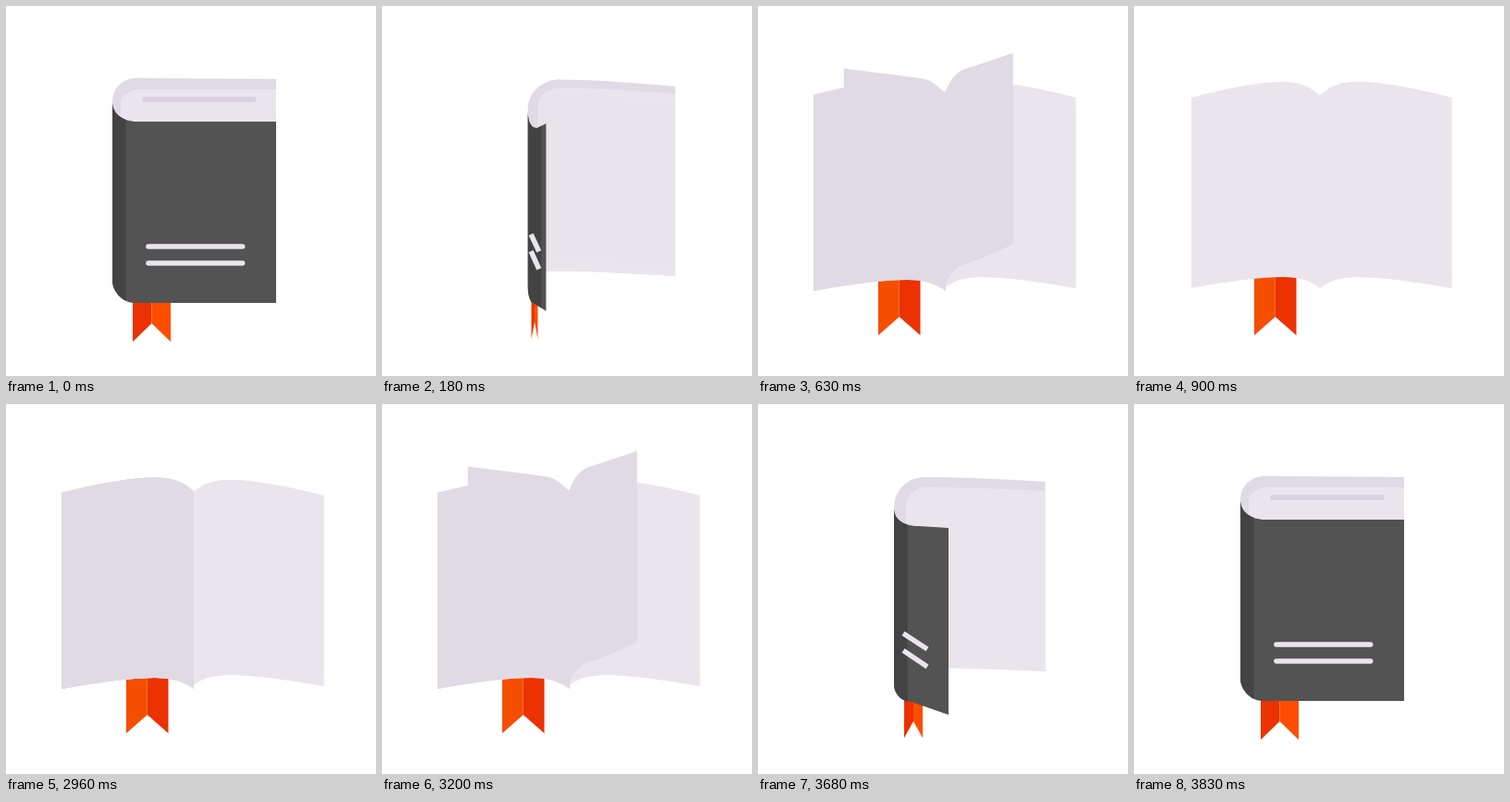
Animation of 400 by 400 pixels, one loop 9.36 s. Source, as an HTML page with a canvas:

```html
<!DOCTYPE html>
<html lang="en">
<head>
<meta charset="utf-8">
<title>Book</title>
<style>
html, body { margin: 0; width: 100%; height: 100%; overflow: hidden; background: #fff; }
canvas { display: block; width: 400px; height: 400px; }
</style>
</head>
<body>
<canvas id="stage" width="400" height="400"></canvas>
<script>
const ctx = document.getElementById('stage').getContext('2d');
const LOOP = 9360, STEP = 30, CLOSE_AT = 2960, LAST = 30;
const PAPER = '#eae5ec', SHADE = '#e0dae4', COVER = '#535353', SPINE = '#434343';
const RED = '#eb3200', ORANGE = '#fd4e00';
const HALF_OPEN = 0.376;

const clamp = v => Math.max(0, Math.min(1, v));
const lerp = (a, b, t) => a + (b - a) * t;
const smooth = t => { t = clamp(t); return t * t * (3 - 2 * t); };

// Value for the closed, part-open and open poses.
const pose = (p, a, b, c) => p < HALF_OPEN
  ? lerp(a, b, p / HALF_OPEN)
  : lerp(b, c, (p - HALF_OPEN) / (1 - HALF_OPEN));

// Page edge from the spine over a knot to the outer corner.
function profile(x, y, kx, ky, ex, ey, sag = 0, bend = 0.25) {
  return {
    x, y, kx, ky, ex, ey,
    ax: lerp(x, kx, bend), ay: lerp(y, ky, 0.67),
    bx: lerp(kx, x, 0.45), by: ky - sag / 2,
    cx: lerp(kx, ex, 0.35), cy: ky + sag
  };
}

function sheet(top, bottom, color) {
  const t = top, b = bottom;
  ctx.beginPath();
  ctx.moveTo(t.x, t.y);
  ctx.bezierCurveTo(t.ax, t.ay, t.bx, t.by, t.kx, t.ky);
  ctx.quadraticCurveTo(t.cx, t.cy, t.ex, t.ey);
  ctx.lineTo(b.ex, b.ey);
  ctx.quadraticCurveTo(b.cx, b.cy, b.kx, b.ky);
  ctx.bezierCurveTo(b.bx, b.by, b.ax, b.ay, b.x, b.y);
  ctx.closePath();
  ctx.fillStyle = color;
  ctx.fill();
}

function poly(color, ...pts) {
  ctx.beginPath();
  pts.forEach(([x, y]) => ctx.lineTo(x, y));
  ctx.closePath();
  ctx.fillStyle = color;
  ctx.fill();
}

function stroke(color, x1, y1, x2, y2, cap) {
  ctx.strokeStyle = color;
  ctx.lineWidth = 5.5;
  ctx.lineCap = cap;
  ctx.beginPath();
  ctx.moveTo(x1, y1);
  ctx.lineTo(x2, y2);
  ctx.stroke();
}

function ribbon(k) {
  const near = k(137, 158, 175.5), far = k(178, 178, 130), mid = (near + far) / 2;
  const top = k(300, 300, 285), tip = k(363, 361, 356), notch = k(343, 343, 336);
  poly(RED, [near, top], [mid, top], [mid, notch], [near, tip]);
  poly(k(0, 0, 1) > 0.5 ? '#f54e00' : ORANGE, [far, top], [mid, top], [mid, notch], [far, tip]);
}

function block(k) {
  const x = k(115, 147, 201), ex = k(292, 310.5, 343.5);
  const bend = k(0, 0, 0.25);
  const bottom = profile(x, k(284, 284, 305), k(140, 180, 241), k(284, 285, 293), ex, k(284, 289, 305));
  const outer = profile(x, k(104, 113, 97), k(140, 180, 241), k(78, 79, 82), ex, k(79, 84, 99), 0, bend);
  const inner = profile(k(124, 160, 201), k(106, 111, 97), k(146, 182, 241), k(90, 90, 82),
    ex, k(90, 94, 99), 0, bend);
  sheet(outer, bottom, k(1, 1, 0) > 0 ? SHADE : PAPER);
  sheet(inner, { ...bottom, x: inner.x }, PAPER);
}

function cover(k, x, w) {
  const y = k(104, 113, 118), low = k(297, 303, 303), ex = x + w;
  const kx = x + Math.min(27, w / 2), bx = x + Math.min(24, w * 0.32);
  const kTop = k(125, 132, 132), kLow = k(321, 322, 318);
  ctx.save();
  ctx.beginPath();
  ctx.moveTo(x, y);
  ctx.bezierCurveTo(x, y + 12, lerp(x, kx, 0.4), kTop, kx, kTop);
  ctx.lineTo(ex, k(125, 134, 99));
  ctx.lineTo(ex, k(321, 336, 305));
  ctx.lineTo(bx, kLow);
  ctx.bezierCurveTo(lerp(x, bx, 0.45), kLow, x, low + 11, x, low);
  ctx.closePath();
  ctx.fillStyle = COVER;
  ctx.fill();
  ctx.clip();
  ctx.fillStyle = SPINE;
  ctx.fillRect(x - 1, 0, 15.5, 400);
  const from = x + w * k(0.22, 0.17, 0.17), to = x + w * k(0.795, 0.61, 0.61);
  const cap = k(0, 1, 1) > 0.1 ? 'butt' : 'round';
  stroke(PAPER, from, k(260, 248, 242), to, k(260, 265, 267), cap);
  stroke(PAPER, from, k(278, 266.5, 260), to, k(278, 284, 286), cap);
  ctx.restore();
}

function leftPage(k, x, w) {
  const kx = x + w * 0.288;
  const y = k(104, 113, 97), low = k(290, 290, 305);
  sheet(
    profile(x, y, kx, y - 15, x + w, k(125, 134, 99)),
    profile(x, low, kx, low - 12, x + w, k(321, 336, 305)),
    PAPER);
}

function turningPage(k, q) {
  const x = k(115, 147, 201), size = k(177, 163, 141);
  const c = Math.cos(Math.PI * q), s = Math.sin(Math.PI * q);
  const land = clamp((q - 0.8) * 5);
  const sx = x + 2 * land, kx = x + 40 * c + 9 * s, ex = x + size * c;
  const edge = (y, rise, drop) => profile(sx, y, kx, y - rise - s * (13.5 + 9.8 * c),
    ex, y + drop - s * (53 + 6 * c), -6 * s);
  ctx.globalAlpha = clamp(q * 8);
  sheet(edge(k(104, 113, 97) - 2.5 * land, 15, 1.5), edge(k(284, 284, 305) + 3 * land, 12, 0), SHADE);
  ctx.globalAlpha = 1;
}

function draw(n) {
  const p = smooth(n / 12);
  const k = (a, b, c) => pose(p, a, b, c);
  const x = k(115, 147, 201), w = k(292, 206, 62) - x;

  ctx.fillStyle = '#fff';
  ctx.fillRect(0, 0, 400, 400);
  ribbon(k);
  block(k);

  if (w < 0) leftPage(k, x, w);
  if (n < LAST) {
    const turns = [0, 1, 2, 3].map(i => smooth((n - 5.05 - 3.8 * i) / 12));
    turns.filter(q => q > 0.005 && q < 0.5).reverse().forEach(q => turningPage(k, q));
    turns.filter(q => q >= 0.5).forEach(q => turningPage(k, q));
  }
  if (w > 0) {
    ctx.globalAlpha = clamp(1 - p / 0.2);
    stroke('#d8d0e0', 150, 101, 268, 101, 'round');
    ctx.globalAlpha = 1;
    cover(k, x, w);
  }
}

function stepAt(t) {
  if (t < CLOSE_AT) return Math.min(LAST, Math.floor(t / STEP));
  return Math.max(0, LAST - 1 - Math.floor((t - CLOSE_AT) / STEP));
}

const start = performance.now();
function tick() {
  draw(stepAt((performance.now() - start) % LOOP));
  requestAnimationFrame(tick);
}
tick();
</script>
</body>
</html>
```
